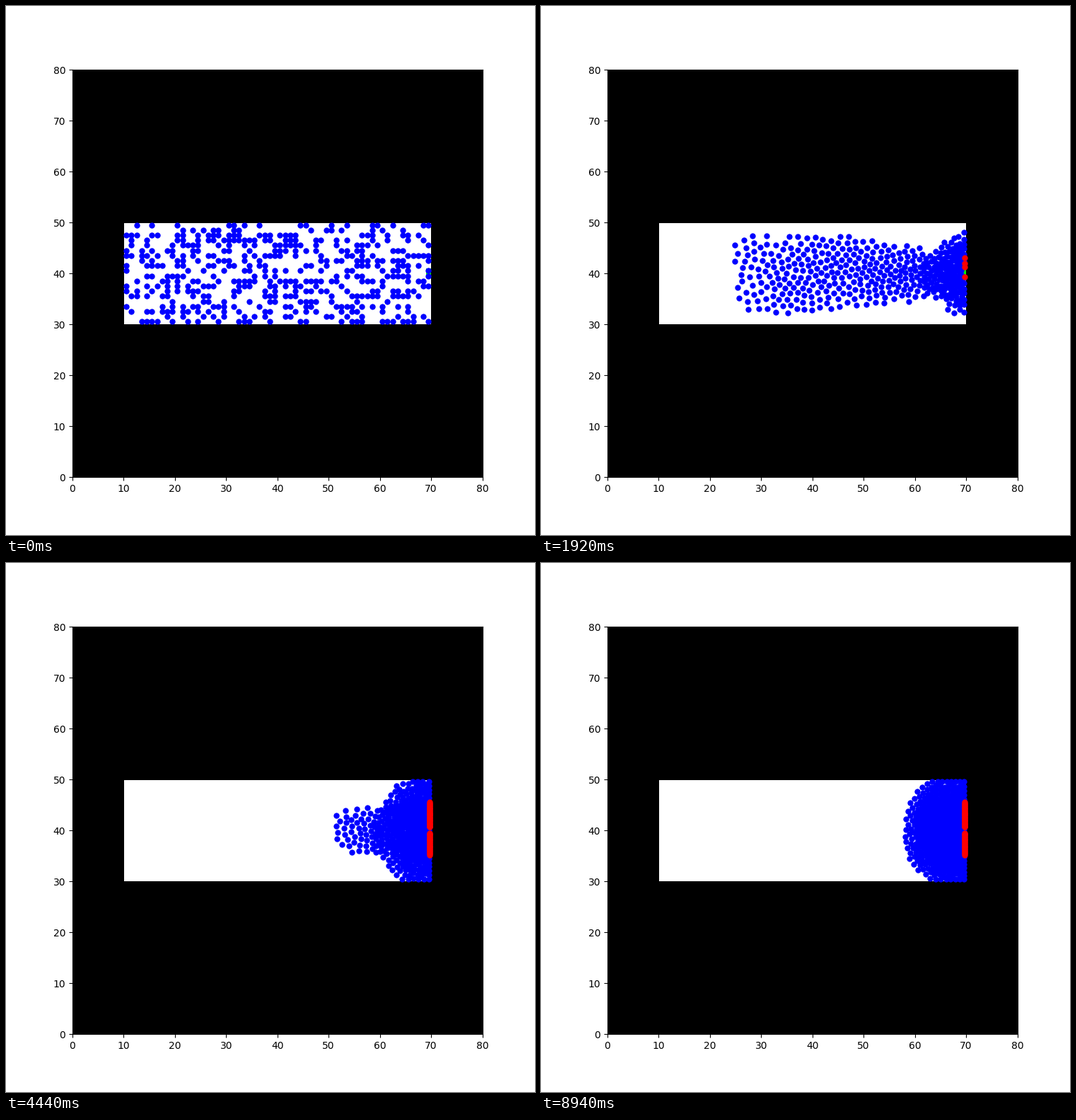
Animation of 748x748 px, one loop 9000 ms. Source, as a matplotlib script:

```python
import numpy as np
import matplotlib.pyplot as plt
from matplotlib.animation import FuncAnimation
from matplotlib.patches import Rectangle

STAGE, FRAMES, STEP_MS = 748, 150, 60
AGENTS, SUBSTEPS = 450, 6
SPEED, RELAX = 0.66, 8.5             # desired speed per frame, reaction time
PUSH, SIZE, FALLOFF = 0.05, 1.05, 0.16
REACH, MAX_PUSH, FALLEN_PUSH = 2.4, 1.2, 0.3
EXIT, EXIT_SHUTS = np.array([70.0, 40.0]), 60
LOW, HIGH = np.array([10.3, 30.35]), np.array([69.6, 49.65])


def start_positions():
    rng = np.random.default_rng(7)
    cells = rng.choice(60 * 20, AGENTS, replace=False)
    return np.column_stack([10.5 + cells % 60, 30.5 + cells // 60])


def fall_schedule():
    """Frame and height at which people fall along the right wall."""
    early = [(16, 39.3), (18, 43.0), (20, 42.0), (22, 41.2), (34, 40.7), (36, 43.3)]
    heights = np.concatenate([np.arange(40.7, 45.55, 0.2), np.arange(39.4, 35.1, -0.2)])
    return early + [(int(44 + 3.2 * abs(y - 40.3)), y) for y in heights]


def close_pairs(pos):
    gap = pos[:, None] - pos[None]
    near = (gap ** 2).sum(2) < REACH ** 2
    return np.nonzero(np.triu(near, 1))


def nearest(pos, fallen, spot):
    """Index and distance of the standing person closest to a spot."""
    dist = np.where(fallen, np.inf, np.hypot(*(pos - spot).T))
    return dist.argmin(), dist.min()


def repulsion(pos, fallen, a, b):
    gap = pos[a] - pos[b]
    dist = np.maximum(np.hypot(gap[:, 0], gap[:, 1]), 1e-3)
    size = np.minimum(PUSH * np.exp((SIZE - dist) / FALLOFF), MAX_PUSH)
    size = np.where(fallen[a] | fallen[b], FALLEN_PUSH * size, size)
    force = gap * (size / dist)[:, None]
    n = len(pos)
    return np.column_stack([
        np.bincount(a, force[:, k], n) - np.bincount(b, force[:, k], n)
        for k in (0, 1)])


def advance(pos, vel, fallen):
    a, b = close_pairs(pos)
    dt = 1 / SUBSTEPS
    for _ in range(SUBSTEPS):
        aim = EXIT - pos
        aim /= np.maximum(np.hypot(aim[:, 0], aim[:, 1]), 0.3)[:, None]
        acc = (SPEED * aim - vel) / RELAX + repulsion(pos, fallen, a, b)
        vel = vel + acc * dt
        vel[fallen] = 0
        moved = pos + vel * dt
        kept = np.clip(moved, LOW, HIGH)
        vel[moved != kept] = 0
        pos = np.where(fallen[:, None], pos, kept)
    return pos, vel


def simulate():
    pos = start_positions()
    vel = np.zeros_like(pos)
    fallen = np.zeros(len(pos), bool)
    schedule = fall_schedule()
    history = [(pos, fallen.copy())]
    for frame in range(1, FRAMES):
        pos, vel = advance(pos, vel, fallen)
        who, dist = nearest(pos, fallen, EXIT)
        if frame < EXIT_SHUTS and dist < 1:
            pos, vel = np.delete(pos, who, 0), np.delete(vel, who, 0)
            fallen = np.delete(fallen, who)
        for when, y in schedule:
            if when == frame:
                spot = np.array([69.75, y])
                who, _ = nearest(pos, fallen, spot)
                pos[who], vel[who], fallen[who] = spot, 0, True
        history.append((pos.copy(), fallen.copy()))
    return history


history = simulate()

fig = plt.figure(figsize=(STAGE / 100, STAGE / 100), dpi=100)
ax = fig.add_axes([94 / STAGE, 82 / STAGE, 579.5 / STAGE, 576 / STAGE])
ax.set(xlim=(0, 80), ylim=(0, 80), facecolor="black")
ax.add_patch(Rectangle((10.1, 30), 59.9, 19.9, color="white", lw=0))
ax.add_patch(Rectangle((69, 39), 1, 2, color="lime", lw=0))
dots = dict(marker="o", ls="", ms=6, mew=0)
walkers, = ax.plot([], [], color="blue", zorder=3, **dots)
victims, = ax.plot([], [], color="red", zorder=4, **dots)


def draw(frame):
    pos, fallen = history[frame]
    walkers.set_data(*pos[~fallen].T)
    victims.set_data(*pos[fallen].T)
    return walkers, victims


anim = FuncAnimation(fig, draw, frames=FRAMES, interval=STEP_MS,
                     init_func=lambda: draw(0), repeat=True, repeat_delay=0)
plt.show()
```
